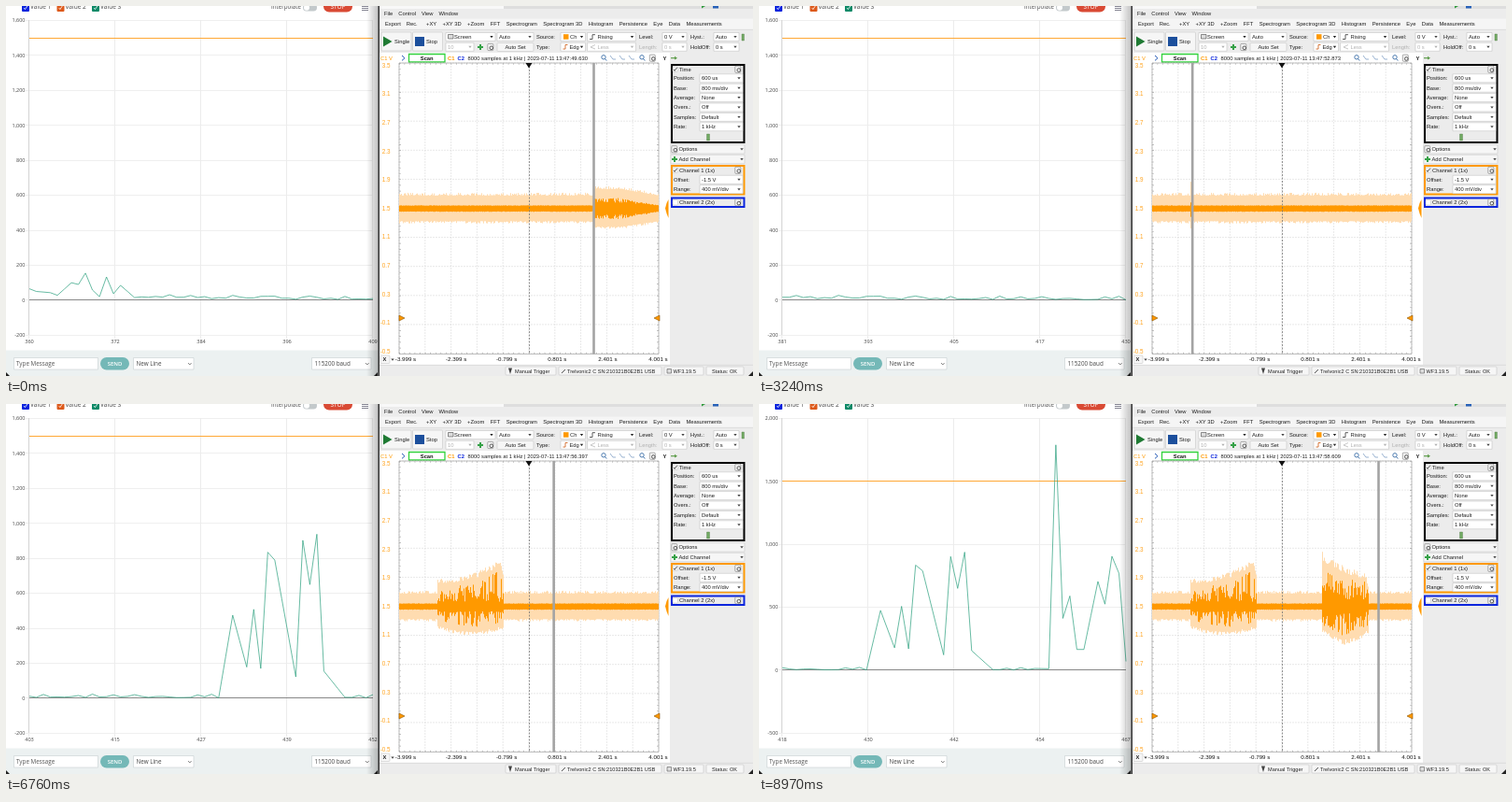
These frames come from a looping animation (800x396 px, 9 s). An HTML page with a canvas:

```html
<!DOCTYPE html>
<html lang="en">
<head>
<meta charset="utf-8">
<title>Serial plotter and oscilloscope</title>
<style>
html, body { margin: 0; width: 100%; height: 100%; overflow: hidden; background: #fff; }
canvas { display: block; }
</style>
</head>
<body>
<canvas id="stage" width="800" height="396"></canvas>
<script>
const c = document.getElementById('stage').getContext('2d');
const SANS = '"Liberation Sans", Arial, sans-serif', OPEN = '"Open Sans", sans-serif';
const ORANGE = '#ff9900', PALE = '#ffdcb0', GREY = '#ececec', BLUE = '#0a25dd';
const LOOP = 9000;

// Turning points of the serial signal, sample: value; the rest is quiet noise
const SPIKES = [
  { 364: 28, 366: 100, 367: 90, 368: 155, 369: 58, 370: 20, 371: 133, 372: 37, 373: 85, 375: 15 },
  { 430: 2, 432: 475, 434: 178, 435: 508, 436: 170, 437: 835, 438: 790, 441: 122,
    442: 903, 443: 650, 444: 938, 445: 155, 448: 5 },
  { 456: 12, 457: 1790, 458: 412, 459: 590, 460: 165, 461: 165, 463: 705, 464: 525, 465: 905, 466: 770, 467: 70 }
].map(points => Object.entries(points).map(([i, v]) => [+i, v]));

// Scope bursts: height at both ends, how it bends between them, density of the solid part
const BURSTS = [
  { from: 462, to: 533, first: 30, last: 58, bend: 2.5, depth: 24, swell: 7, fill: 1.4 },
  { from: 603, to: 653, first: 62, last: 34, bend: 0.6, depth: 28, swell: 13, fill: 0.8 }
];

const mix = (a, b, u) => a + (b - a) * u;
function noise(n) {
  const v = Math.sin(n * 127.1 + 11.7) * 43758.5453;
  return v - Math.floor(v);
}
function serialValue(i) {
  const run = SPIKES.find(r => i >= r[0][0] && i <= r[r.length - 1][0]);
  if (!run) return 2 + 20 * noise(i) ** 2 + 30 * Math.exp((368 - i) / 20) * (0.4 + 0.6 * noise(i + 0.5));
  const k = run.findIndex(p => p[0] >= i);
  if (run[k][0] === i) return run[k][1];
  const [[i0, v0], [i1, v1]] = [run[k - 1], run[k]];
  return mix(v0, v1, (i - i0) / (i1 - i0));
}
// Samples arrive at a slightly uneven rate
const firstSample = t => Math.floor(360.45 + 0.00645 * t + 0.65 * Math.sin(t * Math.PI / 4000));

function box(x, y, w, h, fill, stroke, line = 0.6, radius = 0) {
  c.beginPath();
  c.roundRect(x, y, w, h, radius);
  if (fill) { c.fillStyle = fill; c.fill(); }
  if (stroke) { c.strokeStyle = stroke; c.lineWidth = line; c.stroke(); }
}
function line(points, color, width = 1, dash = []) {
  c.beginPath();
  points.forEach(([x, y]) => c.lineTo(x, y));
  c.strokeStyle = color;
  c.lineWidth = width;
  c.setLineDash(dash);
  c.stroke();
  c.setLineDash([]);
}
const across = (x0, x1, y, ...style) => line([[x0, y], [x1, y]], ...style);
const down = (x, y0, y1, ...style) => line([[x, y0], [x, y1]], ...style);
function poly(points, fill, stroke) {
  c.beginPath();
  points.forEach(([x, y]) => c.lineTo(x, y));
  c.closePath();
  c.fillStyle = fill;
  c.fill();
  if (stroke) { c.strokeStyle = stroke; c.lineWidth = 0.6; c.stroke(); }
}
function text(s, x, y, color = '#1c1c1c', size = 5.8, align = 'left', font = SANS, weight = '') {
  c.font = `${weight} ${size}px ${font}`;
  c.textAlign = align;
  c.textBaseline = 'middle';
  c.fillStyle = color;
  c.fillText(s, x, y);
}
const bold = (s, x, y, color, align) => text(s, x, y, color, 5.8, align, SANS, 'bold');
const open = (s, x, y, align, color = '#444', size = 6.3, weight = '') => text(s, x, y, color, size, align, OPEN, weight);
function flow(words, x, y, gap) {
  words.forEach(s => {
    text(s, x, y);
    x += c.measureText(s).width + gap;
  });
}
function arrowDown(x, y, color = '#444') {
  poly([[x - 1.7, y - 1], [x + 1.7, y - 1], [x, y + 1.2]], color);
}
function combo(x, y, w, label, color, indent = 2) {
  box(x, y - 4.5, w, 9, '#fff', '#c4c4c4');
  text(label, x + indent, y + 0.3, color);
  arrowDown(x + w - 4, y, color);
}
const button = (x, y, w, h) => box(x, y, w, h, '#f6f6f6', '#c8c8c8', 0.6, 1);
const tick = (x, y, color = '#222') => line([[x - 1.6, y], [x - 0.4, y + 1.6], [x + 2, y - 2]], color, 0.8);
function plus(x, y) {
  across(x - 3, x + 3, y, '#35a147', 2);
  down(x, y - 3, y + 3, '#35a147', 2);
}
function ring(x, y, r, color) {
  c.beginPath();
  c.arc(x, y, r, 0, 7);
  c.strokeStyle = color;
  c.lineWidth = 0.9;
  c.stroke();
}
function gear(x, y) {
  box(x - 3.2, y - 3.6, 6, 7.2, '#f4f4f4', '#777', 0.6, 1);
  ring(x + 0.8, y + 0.8, 1.8, '#444');
}
function lens(x, y) {
  ring(x, y - 0.7, 2.2, '#3a6ea8');
  line([[x + 1.5, y + 1], [x + 3.2, y + 3]], '#3a6ea8', 1);
}

function plotter(first) {
  box(0, 0, 400, 396, '#fff');
  [BLUE, '#dd5a1c', '#0f8a68'].forEach((color, i) => {
    const x = 17 + 37.5 * i;
    box(x, -2, 8, 8, color, null, 0, 1);
    tick(x + 3.8, 2, '#fff');
    open('Value ' + (i + 1), x + 9, 1.6, 'left', '#444', 6.6);
  });
  open('Interpolate', 284, 1.6, 'left', '#444', 6.2);
  box(318, -2, 15, 7.5, '#c3c9cb', null, 0, 4);
  box(319, -1.2, 6, 6, '#fff', null, 0, 3);
  box(340, -6, 31, 12.5, '#d94a34', null, 0, 6);
  open('STOP', 355.5, 1.6, 'center', '#fff', 6.6);
  for (let y = 0; y < 5; y += 2) across(381, 388, y + 0.5, '#667', 0.8);

  // The value axis grows once the highest spike comes in
  const high = first >= 408;
  const low = high ? -500 : -200, top = high ? 2000 : 1600, step = high ? 500 : 200;
  const yOf = v => 352.3 - (v - low) * 336.8 / (top - low);
  const level = v => Math.floor(yOf(v)) + 0.5;
  for (let v = low; v <= top; v += step) {
    across(21, 393, level(v), '#efefef');
    open(v.toLocaleString('en-US'), 20.5, yOf(v) + 0.4, 'right', '#444', 5.5);
  }
  for (let k = 0; k <= 4; k++) {
    const x = 25 + 92 * k;
    down(x - 0.5, 15, 356, '#ececec');
    open(first + 12 * k + (k === 4), x, 360, 'center', '#444', 5.6);
  }
  down(24.5, 15, 352, '#d4d4d4');
  across(25, 393, level(0), '#888');
  across(25, 393, level(1500), '#ffa836');
  const points = [];
  for (let k = 0; k <= 49; k++) points.push([25 + k * 368 / 49, yOf(serialValue(first + k))]);
  line(points, '#36a585', 0.75);

  box(0, 368.5, 400, 28, '#ecf1f1');
  box(8.5, 376.5, 90, 12.5, '#fff', '#c6cfd0');
  open('Type Message', 11, 383, 'left', '#555');
  box(101, 376, 31, 13.5, '#74b8b7', null, 0, 6.7);
  open('SEND', 116.5, 383, 'center', '#fff', 6, 600);
  const select = (x, w, label) => {
    box(x, 376.5, w, 12.5, '#fff', '#c6cfd0');
    open(label, x + 3, 383, 'left');
    line([[x + w - 6, 382], [x + w - 4.2, 384], [x + w - 2.4, 382]], '#555', 0.7);
  };
  select(136.5, 64.5, 'New Line');
  select(327.5, 63.5, '115200 baud');
  poly([[0, 392], [0, 396], [4, 396]], '#222');
  poly([[398, 392], [398, 396], [394, 396]], '#222');
  const shade = c.createLinearGradient(386, 0, 399, 0);
  shade.addColorStop(0, 'rgba(0,0,0,0)');
  shade.addColorStop(1, 'rgba(0,0,0,0.25)');
  box(386, 0, 13, 396, shade);
  box(398.5, 0, 1.5, 396, '#333');
}

function toolbar() {
  box(400, 0, 400, 396, GREY);
  box(400, 0, 133, 3, '#f8f8f8');
  box(533, 0, 267, 3, '#dedede');
  poly([[745, 0], [749, 0], [745, 2.5]], '#2e9a3a');
  box(757, 0, 6, 2.5, '#2862b8');
  flow(['File', 'Control', 'View', 'Window'], 405, 8.5, 6);
  box(400, 13.5, 400, 11.5, '#f5f5f5');
  flow(['Export', 'Rec.'], 406, 19.5, 6);
  flow(['+XY', '+XY 3D', '+Zoom', 'FFT', 'Spectrogram', 'Spectrogram 3D', 'Histogram',
    'Persistence', 'Eye', 'Data', 'Measurements'], 450, 19.5, 6.4);
  across(400, 800, 25.3, '#d0d0d0', 0.6);

  const upper = 33, lower = 43.8, dim = '#b0b0b0';
  button(402, 28, 32, 20);
  poly([[404, 32.5], [413.5, 38], [404, 43.5]], '#1f7a33');
  text('Single', 416, 38.3);
  button(435.5, 28, 32, 20);
  box(438, 33, 10, 10, '#1c4f9c');
  text('Stop', 450, 38.3);
  combo(471, upper, 53, 'Screen', '#222', 9);
  box(473.5, 30.5, 5.5, 4.5, '#ddd', '#444');
  combo(471, lower, 30, '10', dim);
  plus(508, 44);
  gear(519, 44);
  combo(526, upper, 39, 'Auto');
  button(526, 39.5, 39, 9);
  text('Auto Set', 545.5, 44.3, '#222', 5.8, 'center');
  text('Source:', 568, 33.3);
  combo(594, upper, 26.5, 'Ch', '#222', 10);
  box(597, 30.2, 5.5, 5.5, ORANGE);
  text('Type:', 568, 44.3);
  combo(594, lower, 26.5, 'Edg', '#222', 9.5);
  line([[596.5, 46], [599, 46], [599, 41.5], [601.5, 41.5]], '#d36b2b', 0.9);
  combo(622.5, upper, 52, 'Rising', '#222', 11);
  line([[625, 35.5], [628, 35.5], [628, 30.7], [631, 30.7]], '#333', 0.8);
  combo(622.5, lower, 52, 'Less', dim, 11);
  line([[631, 41.5], [626, 44], [631, 46]], dim, 0.7);
  text('Level:', 678, 33.3);
  combo(703, upper, 26, '0 V');
  text('Length:', 678, 44.3, dim);
  combo(703, lower, 26, '0 s', dim);
  text('Hyst.:', 733, 33.3);
  combo(758, upper, 27, 'Auto');
  text('HoldOff:', 733, 44.3);
  combo(758, lower, 27, '0 s');
  box(788, 30, 2.5, 7, '#71aa62', '#547c49', 0.4);
}

function sidePanel() {
  const rows = (y, fields) => Object.entries(fields).forEach(([name, value], i) => {
    text(name + ':', 715, y + 10.4 * i + 0.3);
    combo(743, y + 10.4 * i, 46, value);
  });
  const check = (y, on, name) => {
    box(714, y - 2.8, 5.5, 5.5, '#fff', '#bbb', 0.5, 1);
    if (on) tick(716.6, y);
    text(name, 721, y + 0.3);
    gear(784, y);
  };
  const wide = (y, name) => {
    box(712, y - 4.7, 79, 9.4, '#f6f6f6', '#ccc');
    text(name, 720.5, y + 0.3);
    arrowDown(788, y);
  };
  box(711, 50, 89, 334, GREY);
  box(713, 63, 77.5, 83, GREY, '#000', 2);
  check(67.8, true, 'Time');
  rows(77.3, { Position: '600 us', Base: '800 ms/div', Average: 'None', 'Overs.': 'Off', Samples: 'Default', Rate: '1 kHz' });
  box(750.5, 137, 3, 7, '#71aa62', '#547c49', 0.4);
  wide(153.3, 'Options');
  gear(716, 153.3);
  wide(164, 'Add Channel');
  plus(716, 164);
  box(713, 171, 77.5, 30.5, GREY, ORANGE, 2);
  check(175.8, true, 'Channel 1 (1x)');
  rows(185.8, { Offset: '-1.5 V', Range: '400 mV/div' });
  box(713, 205.5, 77.5, 9.5, GREY, BLUE, 2);
  check(210.3, false, 'Channel 2 (2x)');
}

// Trace in one column: pale reach up and down, solid reach up and down
function column(x, sweep) {
  const r = k => noise(x * 1.37 + k * 53.1 + sweep * 7.9);
  const b = sweep === 1 && BURSTS.find(b => x >= b.from && x < b.to);
  if (b) {
    const u = (x - b.from) / (b.to - b.from);
    const ends = Math.min(1, 0.6 + 6 * (1 - u));
    const up = mix(b.first, b.last, u ** b.bend) * ends * (0.82 + 0.18 * r(1));
    const dn = (b.depth + b.swell * Math.sin(Math.PI * u)) * (0.85 + 0.15 * r(2));
    return [up, dn, 5 + (up - 10) * 0.9 * r(3) ** b.fill, 5 + (dn - 10) * 0.9 * r(4) ** b.fill];
  }
  // The sweep before the loop ends in a fading burst
  const fade = sweep < 0 ? Math.min(1, (699 - x) / 42) : 0;
  const core = 3 + 8 * fade * (0.4 + 0.6 * r(3));
  return [14 + 7 * fade + 3 * r(1) ** 2, 13.5 + 6 * fade + 2.5 * r(2) ** 2, core + 0.5 * r(5), core + 0.5 * r(6)];
}

function trace(clock) {
  const travel = 208.5 + clock * 0.03475;
  const sweep = Math.floor(travel / 278), cursor = 421 + travel % 278;
  const columns = [];
  for (let x = 421; x < 699; x++) columns.push([x, ...column(x, x < cursor ? sweep : sweep - 1)]);
  const mid = 216.8;
  c.fillStyle = PALE;
  columns.forEach(([x, up, dn]) => c.fillRect(x, mid - up, 1, up + dn));
  c.fillStyle = ORANGE;
  columns.forEach(([x, , , up, dn]) => c.fillRect(x, mid - up, 1, up + dn));
  down(560.5, 61, 372, '#777', 0.8, [2, 1.5]);
  box(cursor - 1.3, 61, 2.6, 311.5, '#a3a3a3');
}

function scope(clock) {
  toolbar();
  box(400, 50, 311, 334, '#fff');
  sidePanel();
  text('C1 V', 401, 56, ORANGE);
  line([[424, 53], [427, 55.7], [424, 58.4]], '#2458b5', 1);
  box(431.5, 51.5, 38.5, 8.5, '#fff', '#32d13c', 1.3);
  bold('Scan', 450.7, 56, '#111', 'center');
  bold('C1', 473, 56, ORANGE);
  bold('C2', 483.5, 56, BLUE);
  text('8000 samples at 1 kHz | 2023-07-11 13:47:' + (49.63 + clock / 1000).toFixed(3), 494.5, 56);
  lens(640, 55.5);
  for (let x = 650; x <= 670; x += 10) line([[x - 3, 53], [x, 57], [x + 3, 57]], '#7f9fc4', 0.8);
  lens(681, 55.5);
  gear(692.5, 55.7);
  bold('Y', 703.5, 56, '#222');
  across(712, 718, 55.7, '#5f9d4c', 1.2);
  poly([[716, 53.8], [719, 55.7], [716, 57.6]], '#5f9d4c');

  for (let k = 0; k <= 10; k++) {
    down(421 + 27.8 * k, 61, 372.5, '#d8d8d8', 0.6, [2, 1]);
    across(421, 699, 61 + 31.1 * k, '#d8d8d8', 0.6, [2, 1]);
    text((3.5 - 0.4 * k).toFixed(1), 411.5, 64 + 30.6 * k, '#ffa31f', 6.3, 'right');
  }
  box(421, 61, 278, 311.5, null, '#999', 0.6);
  [62, 371.5].forEach(y => across(421, 699, y, '#999', 1.6, [0.6, 4.96]));
  [422, 698].forEach(x => down(x, 61, 372, '#999', 1.6, [0.6, 5.62]));
  trace(clock);
  poly([[556.5, 61], [563.5, 61], [560, 66.5]], '#111');
  poly([[421, 331], [427, 334], [421, 337]], ORANGE, '#8a5200');
  poly([[700, 331], [694, 334], [700, 337]], ORANGE, '#8a5200');
  poly([[709.5, 207], [709.5, 227], [707.5, 222], [706, 216.5], [707.5, 211]], ORANGE);

  button(401, 374, 10, 8.5);
  bold('X', 403.5, 378.5, '#222');
  arrowDown(414, 378.5);
  for (let k = 0; k <= 5; k++) text((1.6 * k - 3.999).toFixed(3) + ' s', 428 + 54.1 * k, 378.5, '#111', 6.2, 'center');

  box(400, 384, 400, 12, GREY);
  across(400, 800, 384.3, '#cfcfcf', 0.6);
  const status = (x, w, label, tx) => {
    button(x, 386, w, 9);
    text(label, tx, 391, '#222', 5.6);
  };
  status(535, 54, 'Manual Trigger', 545);
  status(592, 110, 'Trelvonic2 C SN:210321B0E2B1 USB', 601);
  status(705, 42, 'WF3.19.5', 714.5);
  status(750, 40, 'Status: OK', 756);
  poly([[538, 387.5], [542, 387.5], [540, 394]], '#444');
  line([[595, 393], [599, 389]], '#555', 1);
  box(708, 388.5, 4.5, 4.5, '#ddd', '#555');
  poly([[800, 391], [800, 396], [795, 396]], '#222');
}

let start;
function frame(now) {
  start ??= now;
  const t = (now - start) % LOOP;
  plotter(firstSample(t));
  scope(t * 1.001);
  requestAnimationFrame(frame);
}
requestAnimationFrame(frame);
</script>
</body>
</html>
```
